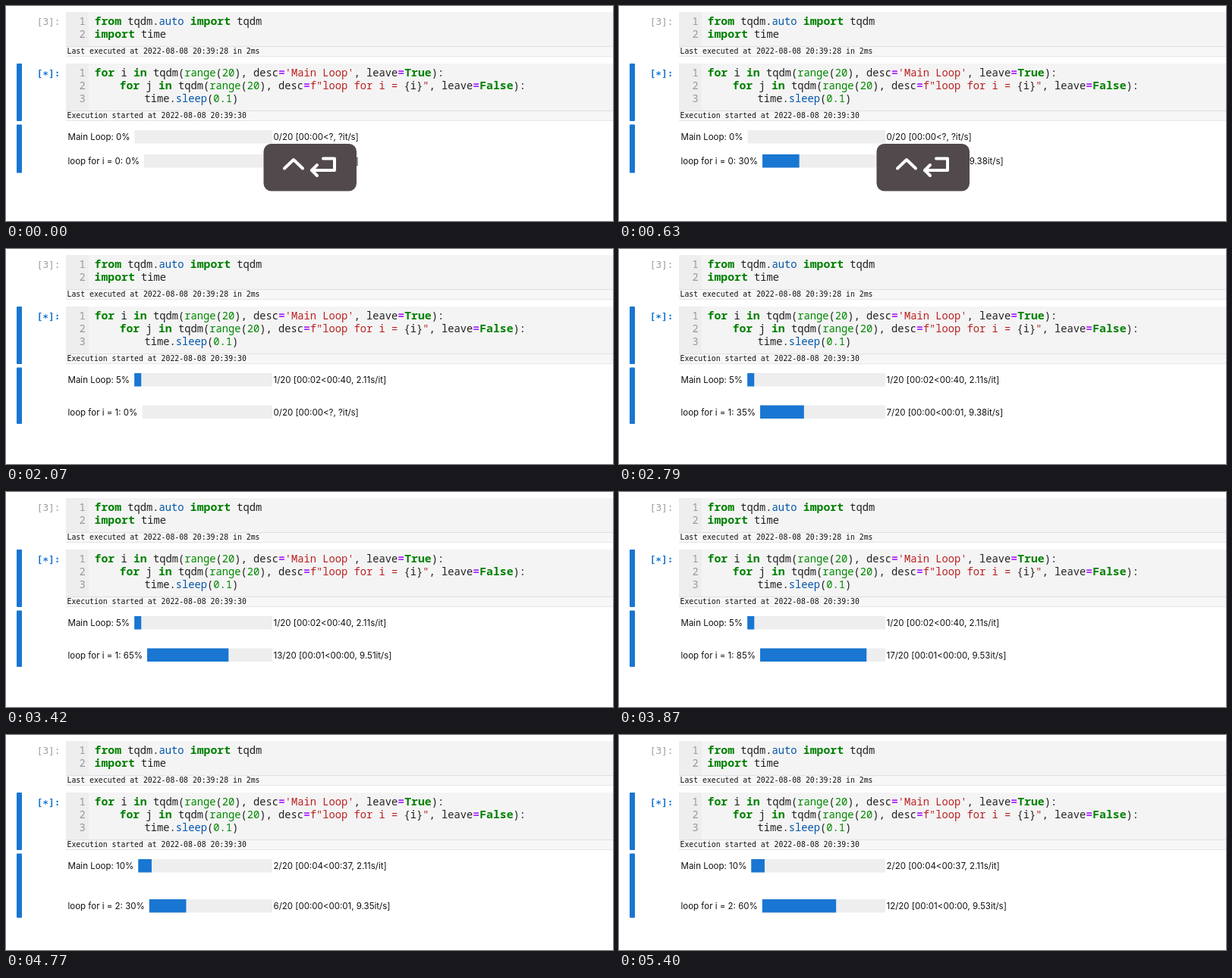
These frames come from a looping animation (800 px wide and 284 px high, 5.49 s). An HTML page with a canvas:

```html
<!DOCTYPE html>
<html lang="en">
<head>
<meta charset="utf-8">
<title>Nested progress bars</title>
<style>
html, body { margin: 0; width: 100%; height: 100%; overflow: hidden; background: #fff; }
canvas { display: block; }
</style>
</head>
<body>
<canvas id="stage" width="800" height="284"></canvas>
<script>
const ctx = document.getElementById('stage').getContext('2d');

const LOOP = 5490, TICK = 90;
const STEP = 105.5, TOTAL = 20, OUTER = STEP * TOTAL;
const LEAD = 100; // time already spent in the first pass when the loop begins

const BLUE = '#1976d2';
const CODE = '13.75px "Noto Sans Mono", monospace';
const CODE_BOLD = 'bold 14.8px "Noto Sans Mono", monospace';
const NOTE = '9.82px "DejaVu Sans Mono", monospace';
const PROMPT = '12.8px "DejaVu Sans Mono", monospace';
const LABEL = '11.5px Inter, sans-serif';

const STYLES = {
  t: ['#212121', CODE],
  k: ['#008000', CODE_BOLD],
  n: ['#008800', CODE],
  s: ['#ba2121', CODE],
  p: ['#0055aa', CODE],
  o: ['#aa22ff', CODE_BOLD]
};

const IMPORTS = [
  [['k', 'from'], ['t', ' tqdm.'], ['p', 'auto'], ['t', ' '], ['k', 'import'], ['t', ' tqdm']],
  [['k', 'import'], ['t', ' time']]
];

const loopHead = (name) => [
  ['k', 'for'], ['t', ` ${name} `], ['k', 'in'], ['t', ' tqdm('], ['n', 'range'],
  ['t', '('], ['n', '20'], ['t', '), desc'], ['o', '=']
];
const loopTail = (flag) => [['t', ', leave'], ['o', '='], ['k', flag], ['t', '):']];

const LOOPS = [
  [...loopHead('i'), ['s', "'Main Loop'"], ...loopTail('True')],
  [['t', '    '], ...loopHead('j'), ['s', 'f"loop for i = '], ['t', '{i}'], ['s', '"'], ...loopTail('False')],
  [['t', '        time.'], ['p', 'sleep'], ['t', '('], ['n', '0.1'], ['t', ')']]
];

function rect(x, y, w, h, color) {
  ctx.fillStyle = color;
  ctx.fillRect(x, y, w, h);
}

function rounded(x, y, w, h, r, color) {
  ctx.fillStyle = color;
  ctx.beginPath();
  ctx.roundRect(x, y, w, h, r);
  ctx.fill();
}

// Returns the x position where the text ends.
function text(str, x, y, color, font) {
  ctx.font = font;
  ctx.fillStyle = color;
  ctx.fillText(str, x, y);
  return x + ctx.measureText(str).width;
}

function cell(top, height, lines, prompt, promptStyle, note) {
  const split = height - 14;
  rect(79, top, 721, height, '#f7f7f7');
  rect(79, top, 721, split, '#f4f4f4');
  rect(79, top, 30, split, '#eeeeee');
  rect(79, top + split, 721, 1, '#e0e0e0');
  rect(79, top + height - 1, 721, 1, '#e6e6e6');
  text(prompt, 40.7, top + 17, ...promptStyle);
  lines.forEach((line, row) => {
    const y = top + 17.2 + row * 17;
    text(String(row + 1), 96.5, y, '#999999', CODE);
    let x = 116.5;
    for (const [style, str] of line) x = text(str, x, y, ...STYLES[style]);
  });
  text(note, 80.5, top + height - 4.2, '#111111', NOTE);
}

function progress(y, label, done, stats) {
  const left = text(`${label}: ${done * 100 / TOTAL}%`, 81.5, y + 4, '#111111', LABEL) + 6;
  const width = 351 - left;
  rect(left, y - 9, width, 17.5, '#eeeeee');
  rect(left, y - 9, width * done / TOTAL, 17.5, BLUE);
  text(`${done}/${TOTAL} [${stats}]`, 352.5, y + 4, '#111111', LABEL);
}

const clock = (seconds) => '00:' + String(Math.floor(seconds)).padStart(2, '0');

function innerStats(pass, done) {
  if (!done) return '00:00<?, ?it/s';
  const limit = [9.6, 9.531, 9.5604][pass];
  const rate = limit - (limit - 8.49) * Math.exp(-0.3237 * (done - 1));
  return `${clock(done * STEP / 1000)}<${clock((TOTAL - done) / rate)}, ${rate.toFixed(2)}it/s`;
}

function outerStats(pass) {
  if (!pass) return '00:00<?, ?it/s';
  const perPass = OUTER / 1000;
  return `${clock(pass * perPass)}<${clock((TOTAL - pass) * perPass)}, ${perPass.toFixed(2)}s/it`;
}

function stroke(points) {
  ctx.beginPath();
  points.forEach(([x, y]) => ctx.lineTo(x, y));
  ctx.stroke();
}

function keyOverlay(alpha) {
  if (alpha <= 0) return;
  ctx.save();
  ctx.globalAlpha = alpha;
  rounded(339.5, 182, 122.5, 62.5, 10, '#51494b');
  ctx.strokeStyle = '#ffffff';
  ctx.lineWidth = 4;
  ctx.lineCap = ctx.lineJoin = 'round';
  stroke([[367, 214.5], [379, 203], [391, 214.5]]);
  stroke([[418, 201.5], [433, 201.5], [433, 217], [403, 217]]);
  stroke([[410, 210], [403, 217], [410, 224]]);
  ctx.restore();
}

function draw(t) {
  const elapsed = t + LEAD;
  const pass = Math.floor(elapsed / OUTER);
  const done = Math.floor(elapsed % OUTER / STEP);
  const shift = pass * 10.5;

  rect(0, 0, 800, 284, '#ffffff');
  cell(8, 59, IMPORTS, '[3]:', ['#9e9e9e', PROMPT], 'Last executed at 2022-08-08 20:39:28 in 2ms');
  cell(76, 76, LOOPS, '[∗]:', [BLUE, 'bold ' + PROMPT], 'Execution started at 2022-08-08 20:39:30');
  rounded(14, 76, 7, 76, 1, BLUE);
  rounded(14, 156.5, 7, 64 + shift, 1, BLUE);

  progress(173, 'Main Loop', pass, outerStats(pass));
  progress(205 + shift, `loop for i = ${pass}`, done, innerStats(pass, done));
  keyOverlay(Math.min(1, (1010 - t) / 200));
}

const start = performance.now();
function frame() {
  const t = (performance.now() - start) % LOOP;
  draw(Math.floor(t / TICK) * TICK);
  requestAnimationFrame(frame);
}
frame();
</script>
</body>
</html>
```
